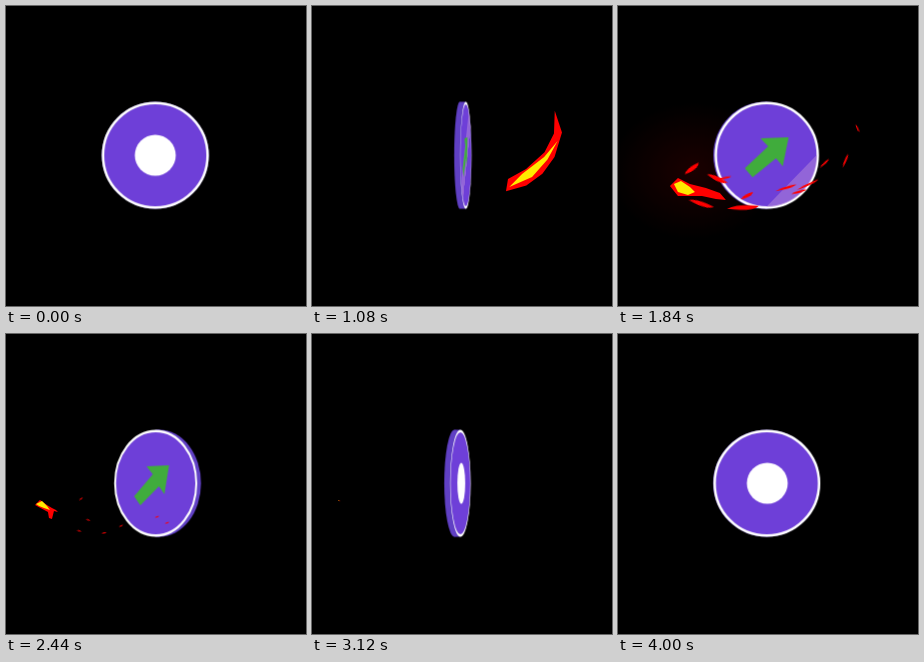
Recreate the animation shown at these times as an HTML page without scripts. Size 300x300 px, loop 4040 ms.

```html
<!DOCTYPE html>
<html lang="en">
<head>
<meta charset="utf-8">
<title>Spinning coin</title>
<style>
@property --a { syntax: "<angle>"; inherits: true; initial-value: 0deg; }

html, body { margin: 0; width: 100%; height: 100%; overflow: hidden; background: #000; }
svg { display: block; width: 100vw; height: 100vh; }

.coin, .coin *, .fire, .fire *, .glow, .ember {
  animation: 4040ms linear infinite;
}

/* coin: every part follows the turning angle --a */
.coin {
  --cos: cos(var(--a));
  --sin: sin(var(--a));
  --flat: max(var(--cos), -1 * var(--cos));
  --side: clamp(-1, 1000 * var(--cos), 1);
  --mid: (2.4 * var(--sin) + 3.9 * sin(2 * var(--a)));
  --half: (3 * var(--side) * var(--sin));
  animation-name: turn;
}
@keyframes turn {
  0% { --a: 0deg; }
  16.83% { --a: 60deg; }
  36.63% { --a: 132deg; }
  45.54% { --a: 167deg; }
  60.4% { --a: 219deg; }
  77.23% { --a: 281deg; }
  100% { --a: 360deg; }
}
.edge { fill: #6040c4; }
.far { transform: translateX(calc(1px * (var(--mid) + var(--half)))) scaleX(var(--flat)); }
.near { transform: translateX(calc(1px * (var(--mid) - var(--half)))) scaleX(var(--flat)); }
.wall { transform: translateX(calc(1px * var(--mid))) scaleX(calc(6 * max(var(--sin), -1 * var(--sin)))); }
.mark { fill: #fff; opacity: calc(1000 * var(--cos)); transform: scaleX(var(--flat)); }
.arrow {
  fill: #40ac3c;
  opacity: calc(-1000 * var(--cos));
  transform: translateX(calc(4px * var(--sin))) scaleX(var(--flat));
}
.coin .shine { fill: #b58ad8; opacity: .5; animation-name: shine; }
@keyframes shine {
  0%, 10% { transform: rotate(45deg) translateX(-75px); }
  16.83% { transform: rotate(45deg) translateX(-32px); }
  36.63% { transform: rotate(45deg) translateX(33px); }
  45.54% { transform: rotate(45deg) translateX(48px); }
  52%, 100% { transform: rotate(45deg) translateX(75px); }
}

/* fire: flies round the right side, crosses the front, burns out at the left */
.fire { animation-name: life; }
@keyframes life {
  0%, 14.2% { transform-origin: 193px 107px; transform: scale(0); }
  16.83% { transform-origin: 193px 107px; transform: scale(1); }
  60.4% { transform-origin: 26px 166px; transform: scale(1); }
  69.3%, 86% { transform-origin: 26px 166px; transform: scale(.08); }
  87%, 100% { transform-origin: 26px 166px; transform: scale(0); }
}
.fire .flame { fill: #f00; animation-name: flame; }
@keyframes flame {
  0%, 16.83% { d: path("M193 107L195 101L203 95L207 89L214 87L222 94L219 99L213 97L207 97L200 100Z"); }
  19.8% { d: path("M205 97L222 87L240 88L252 94L260 104L262 116L253 112L248 104L238 98L222 93Z"); }
  22.77% { d: path("M228 90L252 95L264 108L268 122L264 138L247 155L245 142L253 128L254 114L246 102Z"); }
  28.71% { d: path("M250 112L249 142L232 172L212 190L190 200L168 200L172 188L195 180L222 162L240 140Z"); }
  36.63% { d: path("M212 169L180 185L150 202L128 207L100 202L82 190L90 167L107 176L113 190L165 183Z"); }
  45.54% { d: path("M108 194L98 193L84 190L72 190L60 190L52 180L60 172L72 178L88 182L102 187Z"); }
  60.4%, 100% { d: path("M52 178L48 177L46 185L43 184L42 178L29 171L34 166L41 171L46 174L50 176Z"); }
}
.core { fill: #ffea00; }
.fire .first { animation-name: first; }
@keyframes first {
  0%, 16.83% { d: path("M204 96L208 90L215 87L221 93L219 96L212 94Z"); }
  19.8% { d: path("M238 92L250 97L257 105L258 112L252 107L246 99Z"); }
  22.77% { d: path("M257 104L263 116L261 132L249 148L251 137L257 120Z"); }
  28.71% { d: path("M240 150L222 172L200 190L172 197L190 183L220 166Z"); }
  36.63% { d: path("M149 188L140 198L128 203L114 195L118 189L132 186Z"); }
  42%, 100% { d: path("M108 192L108 192L108 192L108 192L108 192L108 192Z"); }
}
.fire .second { animation-name: second; }
@keyframes second {
  0%, 32% { d: path("M138 195L138 195L138 195L138 195L138 195L138 195Z"); }
  36.63% { d: path("M89 179L96 178L99 188L103 194L98 197L90 188Z"); }
  45.54% { d: path("M56 178L63 175L72 181L77 186L70 189L60 186Z"); }
  60.4%, 100% { d: path("M30 170L36 167L41 172L44 176L38 174L33 172Z"); }
}

/* embers: swell at --x --y, then shrink to a speck at --u --v */
.ember { fill: #f00; animation-name: ember; }
.early { animation-delay: -360ms; }
@keyframes ember {
  0%, 39% { transform: translate(var(--x), var(--y)) rotate(var(--r)) scale(0); }
  43.5%, 46.5% { transform: translate(var(--x), var(--y)) rotate(var(--r)) scale(var(--w), var(--h)); }
  60.4% { transform: translate(var(--u), var(--v)) rotate(var(--r)) scale(2.4, 1); }
  66%, 100% { transform: translate(var(--u), var(--v)) rotate(var(--r)) scale(0); }
}

.glow { opacity: 0; animation-name: glow; }
@keyframes glow {
  0%, 28% { opacity: 0; transform: translateX(40px); }
  36.63% { opacity: 1; transform: translateX(20px); }
  45.54% { opacity: .8; transform: translateX(-20px); }
  56%, 100% { opacity: 0; transform: translateX(-40px); }
}
</style>
</head>
<body>
<svg viewBox="0 0 300 300">
  <defs>
    <radialGradient id="warm">
      <stop offset="0" stop-color="#220000"/>
      <stop offset="1" stop-color="#220000" stop-opacity="0"/>
    </radialGradient>
    <clipPath id="disc"><circle r="51.5"/></clipPath>
    <path id="bit" d="M-1 .3Q-.3 -1 1 -.6Q.6 .9 -1 .3Z"/>
  </defs>

  <ellipse class="glow" cx="95" cy="165" rx="85" ry="70" fill="url(#warm)"/>

  <g transform="translate(149.3 149.3)">
    <g class="coin">
      <circle class="edge far" r="53.5"/>
      <rect class="edge wall" x="-.5" y="-53.5" width="1" height="107"/>
      <g class="near">
        <circle r="52.3" fill="#6e3fd8" stroke="#fff" stroke-width="2.5"/>
        <g clip-path="url(#disc)">
          <rect class="shine" x="-12" y="-60" width="24" height="120"/>
        </g>
      </g>
      <circle class="mark" r="20.5"/>
      <path class="arrow" d="M21 -18L-8 -17L0 -9L-24 13L-16 22L8 3L15 11Z"/>
    </g>
  </g>

  <g class="fire">
    <path class="flame" d="M193 107L195 101L203 95L207 89L214 87L222 94L219 99L213 97L207 97L200 100Z"/>
    <path class="core first" d="M204 96L208 90L215 87L221 93L219 96L212 94Z"/>
    <path class="core second" d="M138 195L138 195L138 195L138 195L138 195L138 195Z"/>
  </g>

  <use href="#bit" class="ember early" style="--x:241px;--y:112px;--r:70deg;--w:7;--h:2;--u:238px;--v:130px"/>
  <use href="#bit" class="ember early" style="--x:239px;--y:141px;--r:-62deg;--w:14;--h:3;--u:219px;--v:165px"/>
  <use href="#bit" class="ember early" style="--x:211px;--y:154px;--r:-38deg;--w:12;--h:2.5;--u:203px;--v:160px"/>
  <use href="#bit" class="ember early" style="--x:203px;--y:172px;--r:-22deg;--w:25;--h:3.5;--u:180px;--v:184px"/>
  <use href="#bit" class="ember early" style="--x:124px;--y:173px;--r:-8deg;--w:16;--h:3;--u:92px;--v:172px"/>
  <use href="#bit" class="ember" style="--x:74px;--y:163px;--r:-28deg;--w:9;--h:4;--u:75px;--v:165px"/>
  <use href="#bit" class="ember" style="--x:99px;--y:173px;--r:32deg;--w:11;--h:4;--u:82px;--v:186px"/>
  <use href="#bit" class="ember" style="--x:83px;--y:198px;--r:24deg;--w:13;--h:4;--u:73px;--v:197px"/>
  <use href="#bit" class="ember" style="--x:125px;--y:202px;--r:2deg;--w:16;--h:4.5;--u:98px;--v:199px"/>
  <use href="#bit" class="ember" style="--x:129px;--y:190px;--r:-20deg;--w:7;--h:3;--u:115px;--v:192px"/>
  <use href="#bit" class="ember" style="--x:168px;--y:182px;--r:-14deg;--w:11;--h:2.2;--u:151px;--v:183px"/>
  <use href="#bit" class="ember" style="--x:181px;--y:186px;--r:-12deg;--w:8;--h:2;--u:161px;--v:189px"/>
</svg>
</body>
</html>
```
